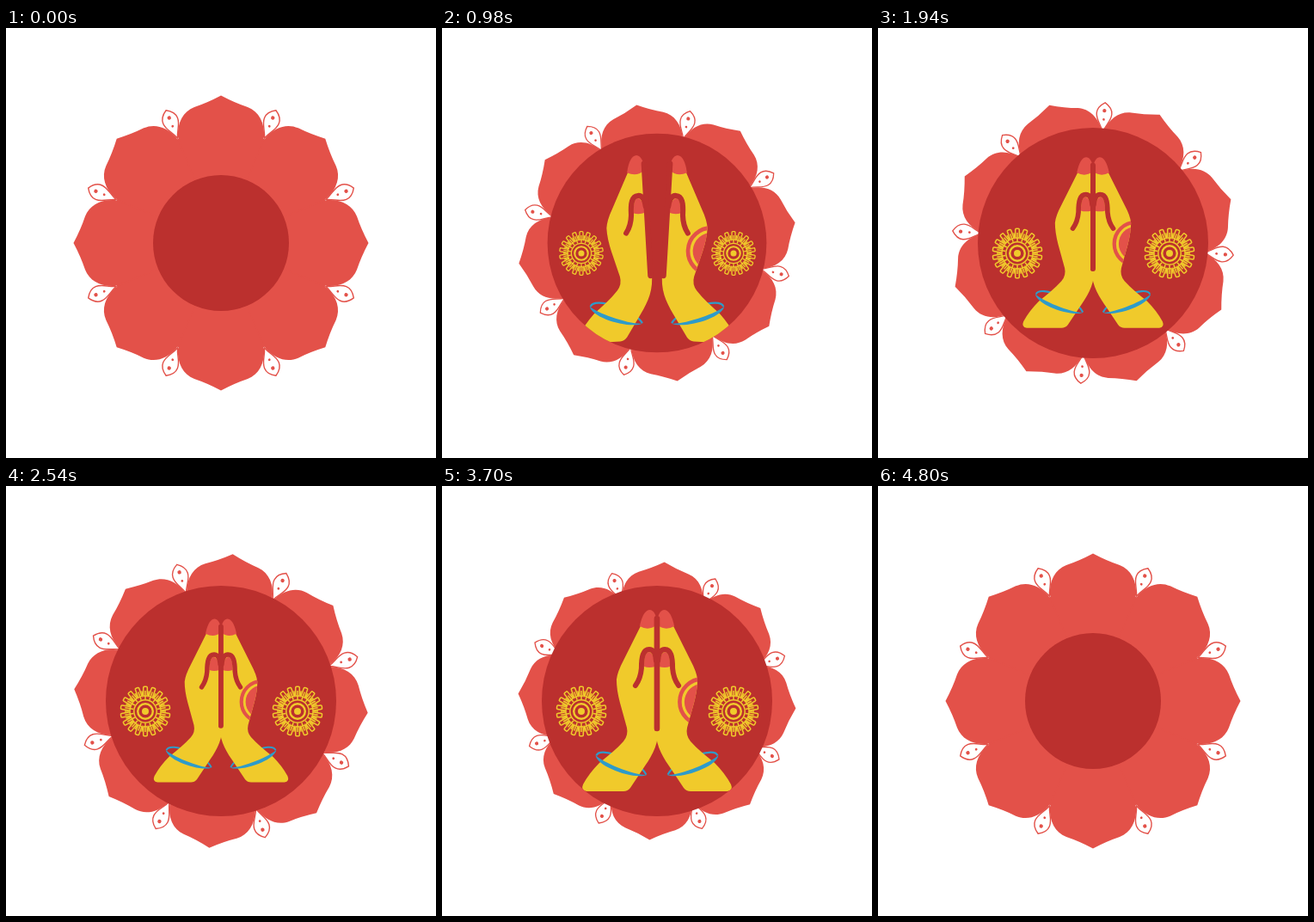
An HTML page that plays this animation: 500x500 px, repeating every 4.82 s.

```html
<!DOCTYPE html>
<html lang="en">
<head>
<meta charset="utf-8">
<title>Folded hands</title>
<style>
html, body { margin: 0; width: 100%; height: 100%; overflow: hidden; background: #fff; }
svg { display: block; width: 100%; height: 100%; }
</style>
</head>
<body>
<svg id="stage" viewBox="0 0 500 500"></svg>
<script>
const RED = '#e35149', DARK = '#bb302e', GOLD = '#f0ca2b', BLUE = '#2e9bc9';
const LOOP = 4820, TICK = 20, END = 118;
const stage = document.getElementById('stage');

const ring = (n, draw) => Array.from({ length: n }, (_, i) =>
  `<g transform="rotate(${i * 360 / n})">${draw(i)}</g>`).join('');

const PETAL = 'M0 0L-50 -123C-51 -140 -44 -153 -31 -158Q-16 -163 0 -171.5' +
  'Q16 -163 31 -158C44 -153 51 -140 50 -123Z';
const TEAR = 'M0 -132C-3 -141 -9 -146 -9 -154C-9 -160 -5 -164 0 -167' +
  'C5 -164 9 -160 9 -154C9 -146 3 -141 0 -132Z';

const flower = `<circle r="131" fill="${RED}"/>` +
  ring(8, () => `<path d="${PETAL}" fill="${RED}"/>`) +
  ring(8, () => `<g transform="rotate(22.5)">
    <path d="${TEAR}" fill="#fff" stroke="${RED}" stroke-width="1.4"/>
    <circle cy="-157.5" r="2.2" fill="${RED}"/>
    <circle cy="-147" r="1.4" fill="${RED}"/></g>`);

const rosette = `<g fill="none" stroke="${GOLD}" stroke-width="1.5">
  ${ring(18, () => '<rect x="-2.3" y="-28.8" width="4.6" height="11" rx="1.2"/><path d="M0 -14V-24"/>')}
  ${ring(18, () => '<path transform="rotate(10)" d="M0 -17V-24"/>')}
  <circle r="13.2"/><circle r="8.8" stroke-width="2.4"/>
  <circle r="4" fill="${GOLD}" stroke="none"/></g>`;

// Left hand, palms together at x = 250
const HAND = 'M250 152V281L251.5 285C251 304 242 317 233 330L219 351Q216 355 211 355H168' +
  'Q161 354 164 347Q171 334 183 322C194 313 203 306 211 297Q217 290 215 281' +
  'L207 252Q203 237 203 225Q204 216 211 203L231 163Q238 150 250 152Z';
const mark = `<g clip-path="url(#palm)" fill="${RED}">
  <circle cx="197" cy="251" r="26.7" fill="none" stroke="${RED}" stroke-width="4.6"/>
  <circle cx="197" cy="251" r="21.2"/></g>`;
const band = 'transform="translate(208.5 324.5) rotate(21)"';

const hand = extra => `<g class="hand">
  <path ${band} d="M-31 0C-31 -13 20 -11 31 0" fill="none" stroke="${BLUE}" stroke-width="2.2"/>
  <path d="${HAND}" fill="${GOLD}"/>${extra}
  <path ${band} d="M-32 0C-26 12 20 11 32 0C20 6 -22 5 -32 0Z" fill="${BLUE}"/>
  <path d="M230 163Q234 144 242 144Q249 145 250.5 161Q241 169 230 163Z" fill="${RED}"/>
  <path d="M235 210Q235 193 241 193Q247 195 248 210Q241 212 235 210Z" fill="${RED}"/>
  <path d="M225 232Q231 224 232 212C232 198 234 190 241 190Q248 190 249 203"
    fill="none" stroke="${DARK}" stroke-width="6" stroke-linecap="round"/>
  <path d="M250 154V282" stroke="${DARK}" stroke-width="6.4" stroke-linecap="round"/></g>`;

stage.innerHTML = `<defs>
  <clipPath id="round"><circle class="disc" cx="250" cy="250" r="79"/></clipPath>
  <clipPath id="palm"><path d="${HAND}"/></clipPath></defs>
  <g id="flower">${flower}</g>
  <circle class="disc" cx="250" cy="250" r="79" fill="${DARK}"/>
  <g clip-path="url(#round)">
    <g class="rosette" data-x="162">${rosette}</g>
    <g class="rosette" data-x="339">${rosette}</g>
    <g id="pair">${hand('')}<g transform="translate(500 0) scale(-1 1)">${hand(mark)}</g></g>
  </g>`;

const all = sel => [...stage.querySelectorAll(sel)];
const bloom = stage.querySelector('#flower'), pair = stage.querySelector('#pair');
const discs = all('.disc'), hands = all('.hand'), rosettes = all('.rosette');

const ease = (t, from, to) => {
  const x = Math.min(1, Math.max(0, (t - from) / (to - from)));
  return 0.5 - 0.5 * Math.cos(Math.PI * x);
};

function render(ms) {
  // One tick in sixty is a held beat
  const c = Math.floor(Math.floor(ms % LOOP / TICK) * 59 / 60) / 2;
  const open = 1 - ease(c, 0, 30) + ease(c, 90, END);
  const grow = ease(c, 0, 31) - ease(c, 95, END);
  const press = 1 - 0.1 * (ease(c, 30, 61) - ease(c, 61, 92));
  const swell = (166.5 + 5 * Math.cos(4 * Math.PI * c / END)) / 171.5;

  bloom.setAttribute('transform',
    `translate(250 250) rotate(${180 * c / END}) scale(${swell})`);
  discs.forEach(d => d.setAttribute('r', 79 + 55 * grow));
  rosettes.forEach(r => r.setAttribute('transform',
    `translate(${r.dataset.x} 262) scale(${grow})`));
  pair.setAttribute('transform',
    `translate(250 250) scale(${press}) translate(-250 -250)`);
  hands.forEach(h => h.setAttribute('transform',
    `translate(${247 - 78 * open} ${284 + 64 * open}) rotate(${-35 * open}) ` +
    `scale(${1 + 0.19 * open}) translate(-247 -284)`));
}

function loop() {
  render(performance.now());
  requestAnimationFrame(loop);
}
loop();
</script>
</body>
</html>
```
